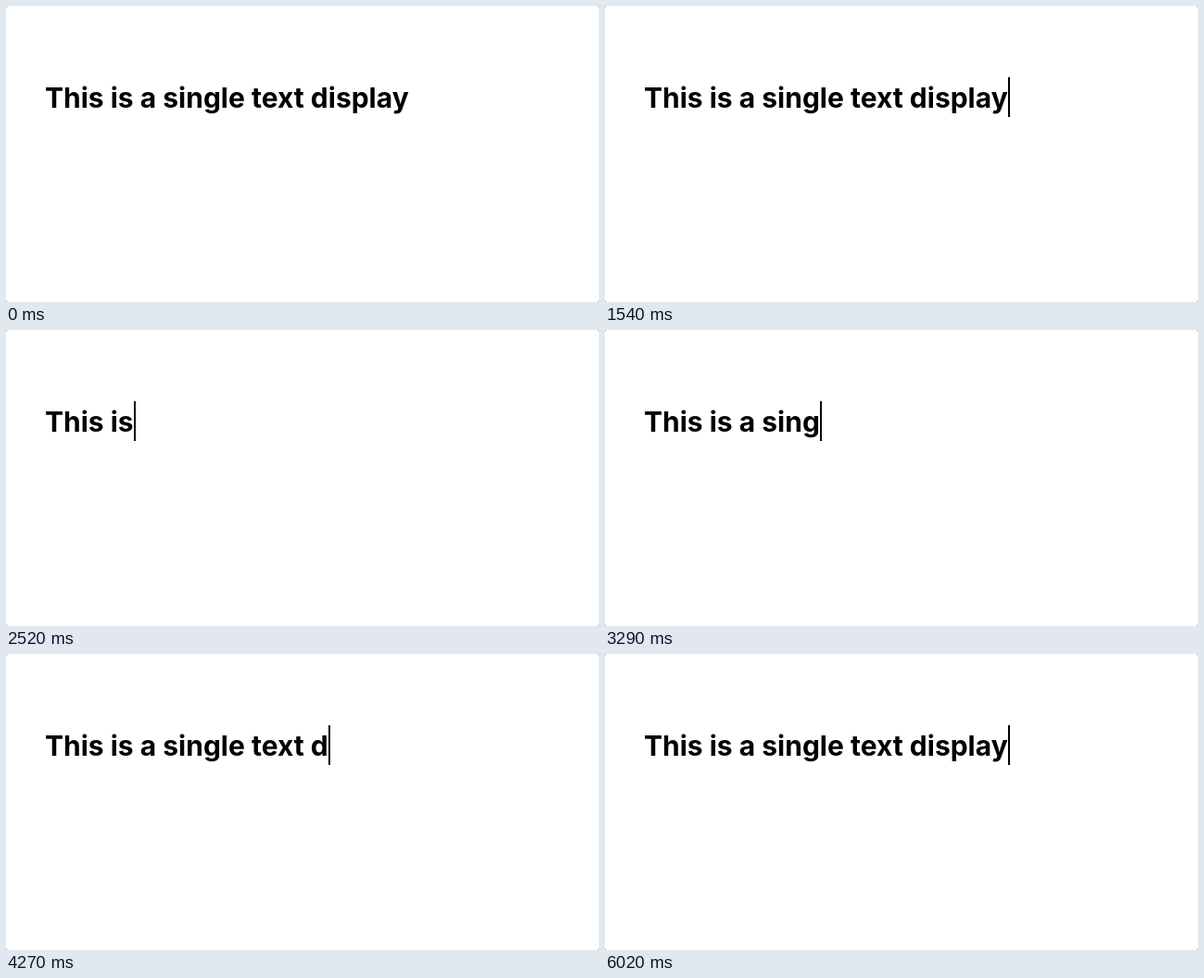
These frames come from a looping animation (640x320 px, 6440 ms). An HTML page:

```html
<!DOCTYPE html>
<html lang="en">
<head>
<meta charset="utf-8">
<title>Typing text</title>
<style>
  html, body { margin: 0; width: 100%; height: 100%; overflow: hidden; background: #777; }
  #stage { position: relative; width: 640px; height: 320px; border-radius: 2px; background: #fff; }
  #line {
    position: absolute; left: 42px; top: 77px; height: 43px;
    border-right: 2px solid #000;
    font: 700 30px/44px Inter, "Open Sans", sans-serif;
    color: #000; white-space: pre;
  }
</style>
</head>
<body>
<div id="stage"><div id="line"></div></div>
<script>
const TEXT = "This is a single text display";
const LOOP = 6440, TICK = 70;
const CLEAR = 1610, TYPE_START = 1855, PER_CHAR = 109.2;

// Caret opacity from each moment on
const CARET = [
  [0, 0], [70, .33], [140, .67], [210, 1], [770, 0], [1330, 1],
  [5390, .5], [5460, 0], [5880, .33], [5950, .67], [6020, 1]
];

const line = document.getElementById("line");

function typedCount(t) {
  if (t < CLEAR) return TEXT.length;
  return Math.max(0, Math.floor((t - TYPE_START) / PER_CHAR) + 1);
}

function caretAlpha(t) {
  return CARET.filter(([start]) => start <= t).pop()[1];
}

function draw(now) {
  const t = Math.floor((now % LOOP) / TICK) * TICK;
  // The caret ignores a trailing space
  const text = TEXT.slice(0, typedCount(t)).trimEnd();
  if (line.textContent !== text) line.textContent = text;
  line.style.borderRightColor = `rgba(0, 0, 0, ${caretAlpha(t)})`;
}

const start = performance.now();
function frame() {
  draw(performance.now() - start);
  requestAnimationFrame(frame);
}
frame();
</script>
</body>
</html>
```
